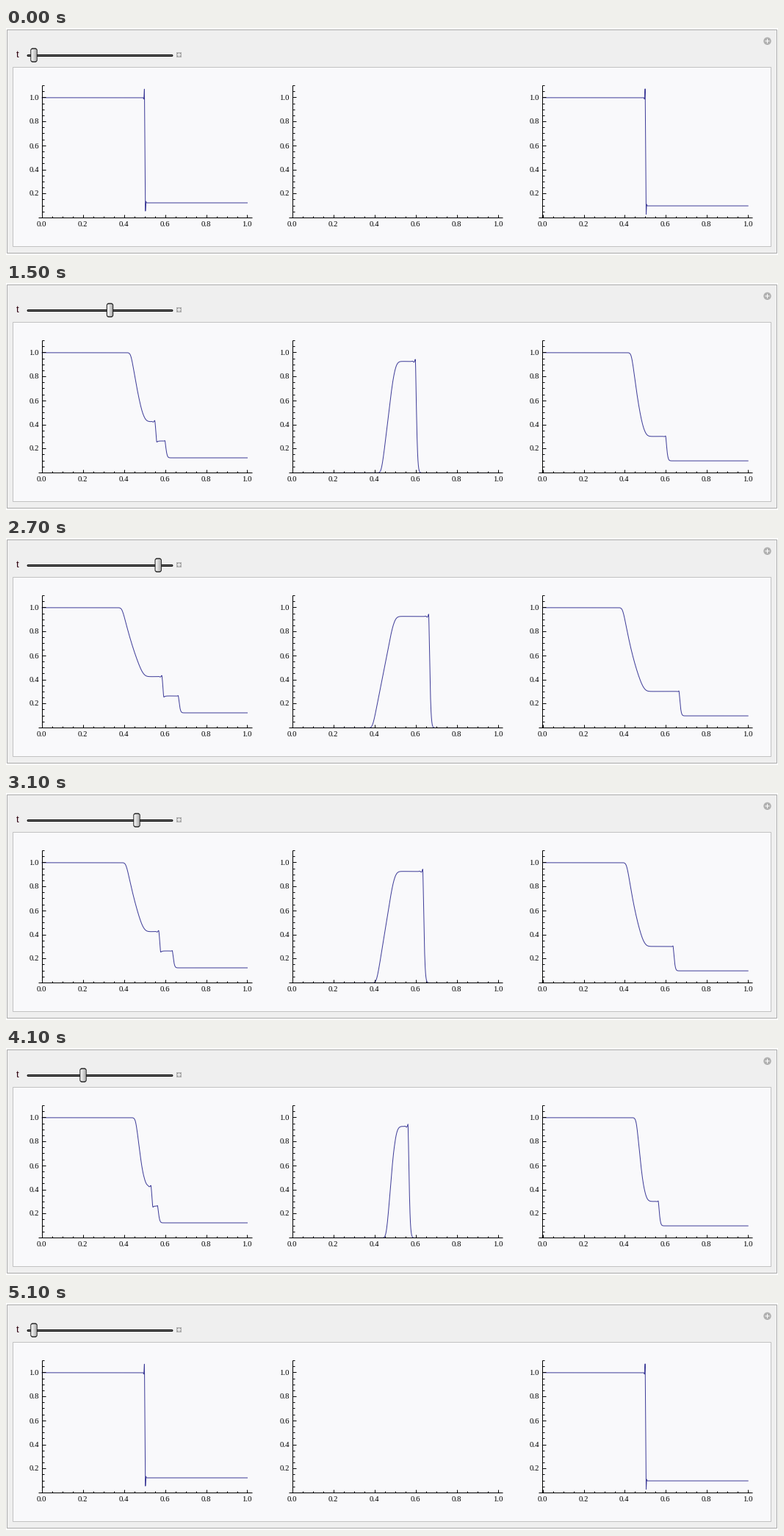
Recreate the animation shown at these times as a matplotlib script. Size 1051 by 309 pixels, loop 5500 ms.

```python
import numpy as np
import matplotlib.pyplot as plt
from matplotlib.animation import FuncAnimation
from matplotlib.patches import Circle, FancyBboxPatch, Rectangle
from matplotlib.transforms import Affine2D

W, H, DPI = 1051, 309, 128
PX = 72 / DPI
FRAMES, INTERVAL, PEAK = 55, 100, 25

# Shock tube with gamma = 1.4: left, star and right states
C0, U_STAR, P_STAR = 1.1832, 0.9275, 0.3031
RHO_L, RHO_R = 0.4263, 0.2656
SHOCK_SPEED, TAIL_SPEED = 1.7522, -0.0703
RHO_0, P_0 = 0.125, 0.1

X = np.linspace(0, 1, 1601)
X_SCALE, Y_SCALE = 279.5, 163.6
AXIS_Y, BASE = 258, 258.45
ORIGINS = (49, 390, 730.7)

fig = plt.figure(figsize=(W / DPI, H / DPI), dpi=DPI, facecolor="white")
ax = fig.add_axes([0, 0, 1, 1])
ax.set_xlim(0, W)
ax.set_ylim(H, 0)
ax.axis("off")


def line(xs, ys, color="black", width=1.0, **kw):
    return ax.plot(xs, ys, color=color, lw=width * PX, **kw)[0]


def box(x0, y0, x1, y1, face, edge):
    ax.add_patch(Rectangle((x0, y0), x1 - x0, y1 - y0, fc=face, ec=edge, lw=PX, zorder=0))


def label(x, y, text, size=10.8, family="Liberation Serif", **kw):
    ax.text(x - 0.5, y - 0.5, text, fontsize=size * PX, family=family,
            va="center_baseline", **kw)


def plus(x, y, r=2.5):
    kw = dict(color="white", zorder=4, snap=False, solid_capstyle="butt")
    line([x - r, x + r], [y, y], **kw)
    line([x, x], [y - r, y + r], **kw)


def draw_panel():
    box(1, 2, 1049, 306, "#efefef", "#a9a9a9")
    box(9, 53, 1041, 297, "#f9f9fb", "#c2c2c2")
    label(14, 36, "t", 13, "Liberation Sans", color="#300010")
    for width, color in ((3, "black"), (1, "#777777")):
        line([30, 226], [37.5, 37.5], color, width, solid_capstyle="round", snap=False)
    ax.add_patch(Rectangle((232, 33), 7, 7, fc="#b0b0b0", ec="none", zorder=3))
    plus(235.5, 36.5)
    ax.add_patch(Circle((1036.5, 17.8), 5.2, fc="#b0b0b0", ec="none", zorder=3))
    plus(1036.5, 17.8, 3)


def draw_axes(origin):
    left = int(origin)
    kw = dict(zorder=5, solid_capstyle="butt")
    line([left - 5, left + 286], [AXIS_Y, AXIS_Y], **kw)
    line([left, left], [78, AXIS_Y], **kw)
    for i in range(23):
        value, major = i / 20, i % 4 == 0
        size = 4 if major else 2
        if i <= 20:
            x = round(origin + value * X_SCALE)
            line([x, x], [AXIS_Y, AXIS_Y - size], **kw)
            if major:
                label(x, 267, f"{value:.1f}", ha="center")
        y = int(BASE - value * Y_SCALE)
        line([left, left + size + 1], [y, y], **kw)
        if major and i:
            label(left - 3.5, y + 0.5, f"{value:.1f}", ha="right")


def rarefaction(t, spread):
    """Smoothed density, velocity and pressure of the expansion fan."""
    edges = [0.5 - C0 * t, 0.5 + TAIL_SPEED * t]
    sigma = spread * np.interp(X, edges, [0.008, 0.0135])
    offsets = np.linspace(-3, 3, 31)
    weights = np.exp(-offsets ** 2 / 2)
    weights /= weights.sum()
    xi = (X[:, None] - 0.503 - sigma[:, None] * offsets) / t
    u = np.clip((C0 + xi) / 1.2, 0, U_STAR)
    c = 1 - 0.2 * u / C0
    return c ** 5 @ weights, u @ weights, c ** 7 @ weights


def ripple(s, amp):
    return 1 + amp * np.cos(np.pi * s / 2.2) * np.exp(np.minimum(s, 0) / 2)


def shock_front(s):
    s = s + 1
    tail = 1.02 * np.exp(-(np.maximum(s, 0) / 2.1) ** 1.5)
    return np.where(s < 0, ripple(s, 0.02), tail)


def contact_front(s):
    a, b, amp = -1.5, 1.6, 0.06
    ramp = 0.5 + (0.5 + amp) * np.cos(np.pi * (s - a) / (b - a))
    after = -amp * np.exp(-np.maximum(s - b, 0) / 1.5)
    return np.where(s < a, ripple(s - a, amp), np.where(s > b, after, ramp))


def initial_state():
    at = [-0.007, -0.004, -0.001, 0.0035, 0.006, 0.009]
    step = np.interp(X - 0.5, at, [1, 0.985, 1.09, -0.088, 0.015, 0])
    return RHO_0 + (1 - RHO_0) * step, 0 * X, P_0 + (1 - P_0) * step


def state(k):
    t = max(0, k - 0.82) * 0.00411
    if t == 0:
        return initial_state()
    spread = min(1, (t / 0.008) ** 0.25)
    rho, u, p = rarefaction(t, spread)

    def from_wave(speed):
        return (X - 0.5 - speed * t) * X_SCALE / spread

    shock = shock_front(from_wave(SHOCK_SPEED))
    contact = contact_front(from_wave(U_STAR))
    rho = rho - (RHO_L - RHO_R) * (1 - contact) - (RHO_R - RHO_0) * (1 - shock)
    return rho, u * shock, p - (P_STAR - P_0) * (1 - shock)


def make_thumb(shift):
    transform = shift + ax.transData
    ax.add_patch(FancyBboxPatch((-4, 28), 8, 18, boxstyle="round,pad=0,rounding_size=2.5",
                                fc="#d8d8d8", ec="#1c1c1c", lw=1.4 * PX,
                                zorder=6, transform=transform))
    for i, shade in enumerate(np.linspace(0.98, 0.7, 7)):
        line([i - 3, i - 3], [29.5, 44.5], str(shade), 1.2, zorder=7,
             transform=transform, solid_capstyle="butt", snap=False)


draw_panel()
for origin in ORIGINS:
    draw_axes(origin)
curves = [line(x0 + X * X_SCALE, BASE + 0 * X, "#3f3d99", zorder=3, snap=False)
          for x0 in ORIGINS]
thumb_shift = Affine2D()
make_thumb(thumb_shift)


def update(i):
    k = min(i, PEAK, max(0, 2 * PEAK + 1 - i))
    for curve, values in zip(curves, state(k)):
        curve.set_ydata(BASE - Y_SCALE * values)
    thumb_shift.clear().translate(max(38, 32 + 7.3 * k), 0)
    return curves


anim = FuncAnimation(fig, update, frames=FRAMES, interval=INTERVAL, repeat=True, repeat_delay=0)
plt.show()
```
